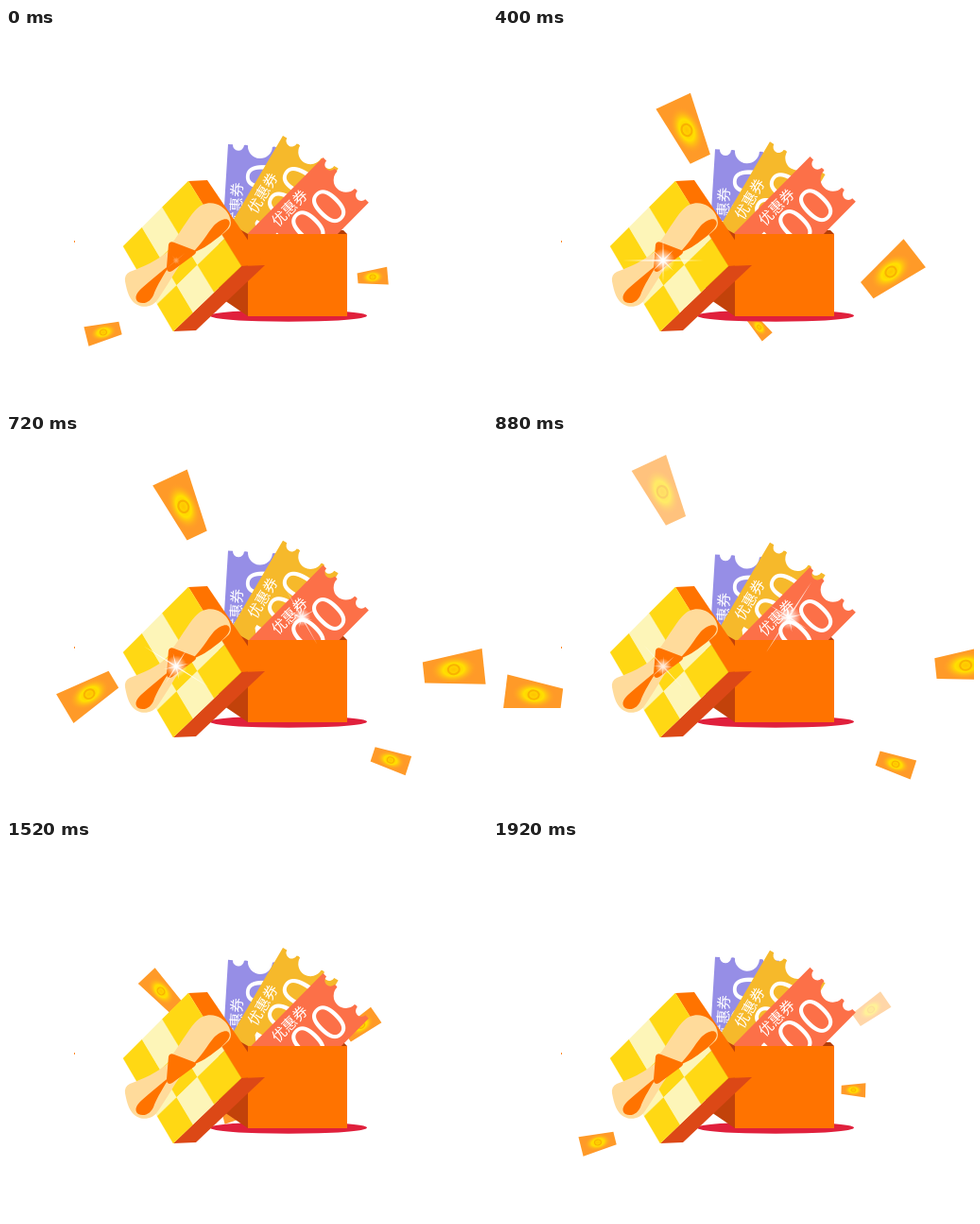
Write an HTML page that moves like this. It is 509 px wide and 400 px high and loops after 2 s.

```html
<!DOCTYPE html>
<html lang="zh">
<head>
<meta charset="utf-8">
<title>优惠券</title>
<style>
  html, body { margin: 0; width: 100%; height: 100%; overflow: hidden; background: #fff; }
  svg { display: block; width: 100%; height: 100%; }
  .label { font: 400 15.5px "Noto Sans CJK SC", "Noto Sans CJK", sans-serif; text-anchor: middle; }
  .digits { font: 400 54px "Open Sans", "Noto Sans", sans-serif; text-anchor: end; }
</style>
</head>
<body>
<svg viewBox="0 0 509 400">
  <defs>
    <radialGradient id="gold">
      <stop offset="0" stop-color="#ffc400"/>
      <stop offset=".45" stop-color="#ffe000"/>
      <stop offset="1" stop-color="#ff9a28" stop-opacity="0"/>
    </radialGradient>
    <radialGradient id="shine">
      <stop offset="0" stop-color="#fff"/>
      <stop offset=".25" stop-color="#fff" stop-opacity=".8"/>
      <stop offset="1" stop-color="#fff" stop-opacity="0"/>
    </radialGradient>
  </defs>
  <rect x="72" y="225" width="1" height="2" fill="#ff8a2a"/>
  <g id="coupons"></g>
  <path d="M345 214H357L361 218H345Z" fill="#b33d08"/>
  <g id="cards"></g>
  <ellipse cx="299" cy="304.5" rx="83" ry="6.3" fill="#e0203c"/>
  <path d="M256 218V305L225 284V200Z" fill="#c2420a"/>
  <path d="M256 218H361V305H256Z" fill="#ff7300"/>
  <path d="M193 162L213 161L274 251L249 252Z" fill="#ff7300"/>
  <path d="M249 252L274 251L201 320L177 321Z" fill="#dc4816"/>
  <g id="lid"></g>
  <g fill="#ff7300">
    <path d="M174 230C188 212 197 192 208 187C219 182 231 188 236 198Q240 207 236 212C226 222 205 235 190 244Z" fill="#ffdb9b"/>
    <path d="M197 238C206 230 214 216 220 209C226 203 234 200 236 204C239 208 233 215 224 222C214 230 206 235 197 238Z"/>
    <path d="M172 236C160 246 145 253 131 258Q125 261 126 268C128 279 131 289 139 293C147 297 156 294 160 288C168 277 176 262 186 248Z" fill="#ffdb9b"/>
    <path d="M174 250C166 262 160 273 157 280C154 290 146 293 140 290C135 286 138 280 144 275C154 266 164 258 174 250Z"/>
    <path d="M172 229Q173 225 178 227L199 235Q203 237 199 240L176 257Q170 260 170 253Z"/>
  </g>
  <g id="stars"></g>
</svg>
<script>
const LOOP = 2000, STEP = 80;
const NS = 'http://www.w3.org/2000/svg';
const byId = id => document.getElementById(id);
const clamp = (v, lo, hi) => Math.min(hi, Math.max(lo, v));

// Places t on a span that may run past the end of the loop.
const onSpan = (t, start) => t < start ? t + LOOP : t;

function set(node, attrs) {
  for (const name in attrs) node.setAttribute(name, attrs[name]);
}

function add(parent, tag, attrs = {}, text) {
  const node = document.createElementNS(NS, tag);
  set(node, attrs);
  if (text) node.textContent = text;
  return parent.appendChild(node);
}

// Chequered lid: a 3 by 3 grid on a slanted quadrilateral.
function drawLid() {
  const cols = [0, .29, .6, 1], rows = [0, .36, .68, 1];
  const corner = (c, r) => {
    const u = cols[c], v = rows[r];
    return `${124 + 69 * u + 53 * v + 3 * u * v},${231 - 69 * u + 90 * v}`;
  };
  for (let r = 0; r < 3; r++) for (let c = 0; c < 3; c++) {
    const points = [corner(c, r), corner(c + 1, r), corner(c + 1, r + 1), corner(c, r + 1)].join(' ');
    const fill = (r + c) % 2 ? '#fdf5b8' : '#ffd814';
    add(byId('lid'), 'polygon', { points, fill, stroke: fill, 'stroke-width': .4 });
  }
}

// Big ticket: text runs along x, the notched end lies on x = 0. It bobs three times per loop.
function makeCard({ x, y, angle, fill, swing, peak }) {
  const root = add(byId('cards'), 'g');
  add(root, 'path', {
    d: 'M-116 0H0V5A6 6 0 0 0 0 17Q1 19 0 21A13 13 0 0 0 0 47Q1 49 0 51A6 6 0 0 0 0 63V68H-116Z', fill
  });
  add(root, 'text', { class: 'label', x: -63, y: 18, fill: '#fff' }, '优惠券');
  add(root, 'text', { class: 'digits', x: -17, y: 60, fill: '#fff' }, '100');
  return t => {
    const dy = -swing * Math.cos((t - peak) * 6 * Math.PI / LOOP);
    set(root, { transform: `translate(${x} ${y + dy}) rotate(${angle})` });
  };
}

// Flying coupon: passes (x, y) at time `at`, drifting by (vx, vy) per step.
// Before that it moves `rush` times as fast, turning by `spin` and growing by `grow` per step.
function makeCoupon({ at, x, y, vx, vy, rush = 1, angle, spin = 0, settle = 0, size, grow = 0, taper, life }) {
  const root = add(byId('coupons'), 'g');
  const left = 15 + 4 * taper, right = 15 - 4 * taper;
  add(root, 'polygon', { points: `-32,${-left} 32,${-right} 32,${right} -32,${left}`, fill: '#ff9a28' });
  add(root, 'ellipse', { rx: 25, ry: 15, fill: 'url(#gold)' });
  add(root, 'ellipse', { rx: 6, ry: 5, fill: 'none', stroke: '#f59a00', 'stroke-width': 2, opacity: .6 });
  return t => {
    const k = (onSpan(t, at - 6 * STEP) - at) / STEP;
    const before = Math.min(k, 0), after = Math.max(k, 0);
    const way = before * rush + after;
    const turn = angle + spin * before + settle * Math.min(after, 4);
    const opacity = clamp(1 + (life - k) / 2.5, 0, 1);
    set(root, {
      opacity,
      transform: `translate(${x + vx * way} ${y + vy * way}) rotate(${turn}) scale(${size + grow * before})`
    });
  };
}

function makeStar({ x, y, start, length, angle, spin }) {
  const root = add(byId('stars'), 'g');
  const ray = (turn, reach) => add(root, 'path', {
    d: `M${-reach} 0L0 -1L${reach} 0L0 1Z`, fill: '#fff', transform: `rotate(${turn})`, opacity: .8
  });
  add(root, 'circle', { r: 13, fill: 'url(#shine)' });
  ray(0, 45);
  ray(90, 24);
  ray(45, 16);
  ray(-45, 16);
  return now => {
    const age = onSpan(now, start) - start;
    const size = Math.sin(Math.PI * clamp(age / length, 0, 1)) ** .7;
    set(root, {
      opacity: Math.min(1, size * 1.3),
      transform: `translate(${x} ${y}) rotate(${angle + spin * age}) scale(${size})`
    });
  };
}

drawLid();

const parts = [
  ...[
    { at: 400, x: 205, y: 108, vx: -4.3, vy: -7.8, rush: 3, angle: 65, size: 1.06, grow: .1, taper: 1, life: 5 },
    { at: 2400, x: 421, y: 258, vx: 13.2, vy: -2.2, rush: .5, angle: -38, spin: -6.6, settle: 8, size: 1, grow: .1, taper: -1, life: 6 },
    { at: 1840, x: 119, y: 318, vx: -8, vy: 2, rush: 4, angle: -14, size: .58, taper: .8, life: 4 },
    { at: 720, x: 407, y: 345, vx: 9.5, vy: 2.15, rush: 3.3, angle: 18, spin: -8, size: .62, grow: .05, taper: -.5, life: 5.5 },
    { at: 880, x: 43, y: 276, vx: -11, vy: .2, rush: 2.05, angle: 7, spin: 19, size: .94, taper: 1, life: 3.5 },
    { at: 1520, x: 164, y: 160, vx: -5, vy: -8.5, angle: 47, size: .7, taper: .6, life: 1 },
    { at: 1520, x: 376, y: 196, vx: 4.8, vy: -3.3, angle: -35, size: .6, taper: -.4, life: 3.5 }
  ].map(makeCoupon),
  ...[
    { x: 235, y: 126, angle: -86.5, fill: '#968ee6', swing: 3, peak: -10 },
    { x: 293, y: 116.5, angle: -59.5, fill: '#f6b92b', swing: 4, peak: 760 },
    { x: 335.5, y: 137.5, angle: -45.3, fill: '#fc7048', swing: 3.5, peak: 517 }
  ].map(makeCard),
  ...[
    { x: 180, y: 246, start: -60, length: 1160, angle: -46, spin: .1 },
    { x: 313, y: 194, start: 560, length: 720, angle: -2, spin: .39 }
  ].map(makeStar)
];

const began = performance.now();
function draw() {
  const elapsed = (performance.now() - began) % LOOP;
  const t = Math.floor(elapsed / STEP) * STEP;
  parts.forEach(update => update(t));
  requestAnimationFrame(draw);
}
draw();
</script>
</body>
</html>
```
